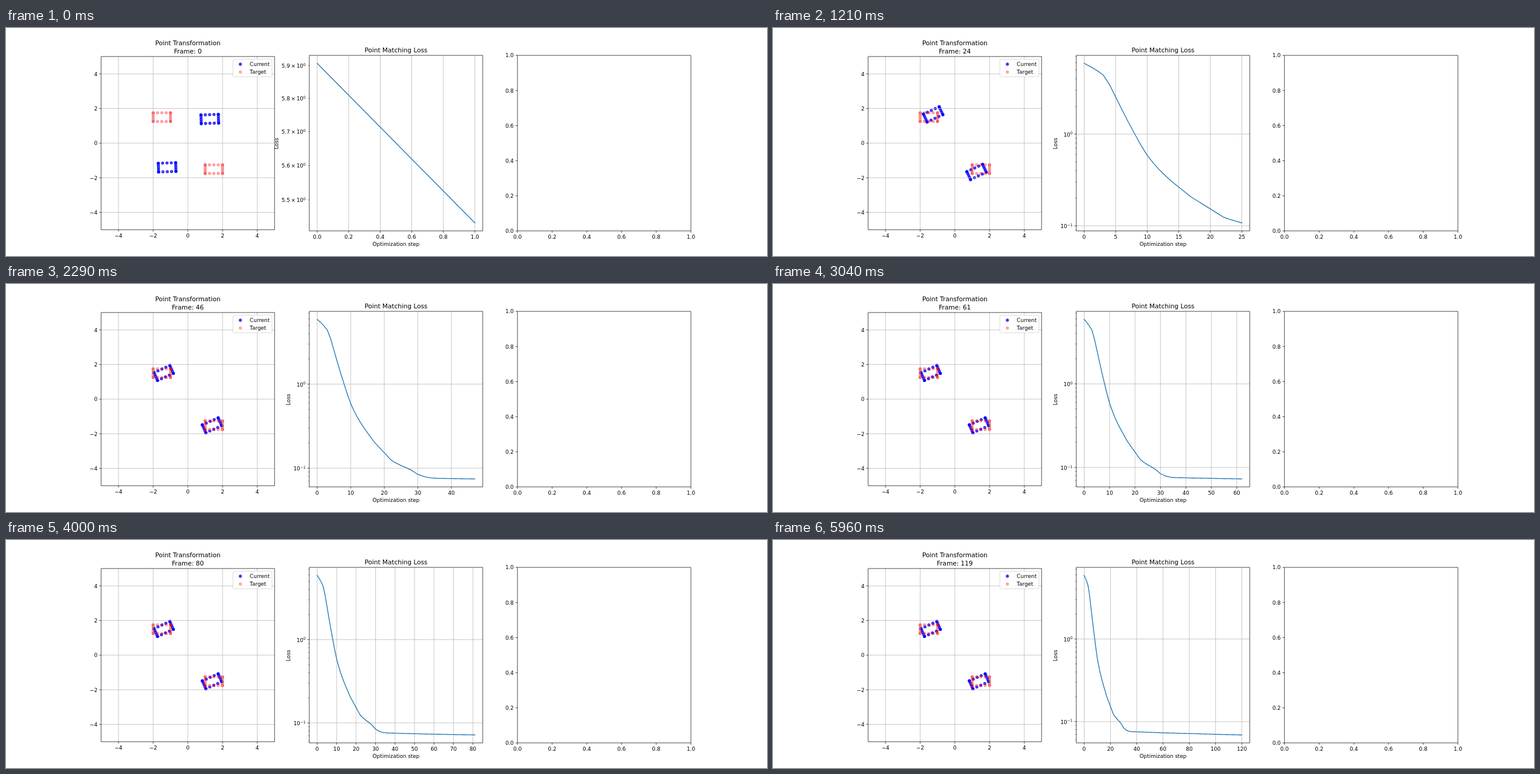
Animation, 1280 px wide and 384 px high, one loop 6000 ms. Source, as an HTML page with a canvas:

```html
<!DOCTYPE html>
<html>
<head>
<meta charset="utf-8">
<style>
  html, body { margin: 0; width: 100%; height: 100%; overflow: hidden; background: #fff; }
  canvas { display: block; width: 1280px; height: 384px; }
</style>
</head>
<body>
<canvas id="stage"></canvas>
<script>
const PT = 64 / 72;                       // pixels per typographic point
const FONT = 10 * PT, TITLE = 12 * PT;
const SIZE = 291.76, TOP = 46.08, BOTTOM = 341.76;
const points = { x: 160, y: 48.04, w: SIZE, h: SIZE };
const loss = { x: 510.12, y: TOP, w: SIZE, h: BOTTOM - TOP };
const empty = { x: 860.24, y: TOP, w: SIZE, h: BOTTOM - TOP };

// [step, loss]; interpolated in log space
const LOSS = [[0, 5.907], [1, 5.434], [2, 4.95], [3, 4.42], [4, 3.48], [5, 2.53], [6, 1.84],
  [7, 1.35], [8, 1.01], [9, .757], [10, .585], [11, .48], [12, .402], [13, .345], [14, .3],
  [15, .264], [17, .205], [20, .153], [22, .1253], [23, .118], [25, .1075], [27, .0995],
  [28, .095], [29, .0895], [30, .0843], [32, .079], [34, .0765], [36, .0757], [47, .0745],
  [62, .073], [81, .0717], [101, .0701], [120, .069]].map(([s, v]) => [s, Math.log10(v)]);

// [frame, polar angle, radius, tilt] of one rectangle; the other mirrors it
const POSE = [[0, 48.6, 1.86, 2], [2, 55, 1.89, 5], [4, 71, 1.95, 10], [9, 105, 2.05, 20],
  [14, 118, 2.08, 24], [19, 123.5, 2.08, 25], [24, 127, 2.08, 25], [29, 131, 2.065, 24.5],
  [33, 132.7, 2.055, 24]];

const canvas = document.getElementById("stage"), ctx = canvas.getContext("2d");
const ratio = window.devicePixelRatio || 1;
canvas.width = 1280 * ratio;
canvas.height = 384 * ratio;
ctx.scale(ratio, ratio);

function sample(keys, at, column = 1) {
  const i = keys.findIndex(k => k[0] >= at);
  if (i < 0) return keys[keys.length - 1][column];
  if (i === 0) return keys[0][column];
  const a = keys[i - 1], b = keys[i];
  return a[column] + (b[column] - a[column]) * (at - a[0]) / (b[0] - a[0]);
}

function line(x1, y1, x2, y2, color = "#000", width = .8 * PT) {
  ctx.strokeStyle = color;
  ctx.lineWidth = width;
  ctx.beginPath();
  ctx.moveTo(x1, y1);
  ctx.lineTo(x2, y2);
  ctx.stroke();
}

function setFont(size) {
  ctx.font = `${size}px "DejaVu Sans", sans-serif`;
}

function text(str, x, y, align = "center", size = FONT) {
  setFont(size);
  ctx.fillStyle = "#000";
  ctx.textAlign = align;
  ctx.fillText(str, x, y);
}

function width(str, size = FONT) {
  setFont(size);
  return ctx.measureText(str).width;
}

const signed = str => String(str).replace("-", "\u2212");

function ticks(lo, hi) {
  const raw = (hi - lo) / 9, scale = 10 ** Math.floor(Math.log10(raw));
  const step = scale * [1, 2, 2.5, 5, 10].find(s => s * scale >= raw - 1e-9);
  let digits = 0;
  while (Math.abs(step * 10 ** digits - Math.round(step * 10 ** digits)) > 1e-6) digits++;
  const out = [];
  for (let i = Math.ceil(lo / step - 1e-9); i * step <= hi + 1e-9; i++)
    out.push({ value: i * step, label: signed((i * step).toFixed(digits)) });
  return out;
}

function xTick(ax, x, label) {
  const y = ax.y + ax.h;
  line(x, y, x, y + 3.5 * PT);
  text(label, x, y + 13.5);
}

function yTick(ax, y, label) {
  line(ax.x, y, ax.x - 3.5 * PT, y);
  if (label) text(label, ax.x - 7 * PT, y + 3.3, "right");
}

function frameBox(ax) {
  ctx.strokeStyle = "#000";
  ctx.lineWidth = .8 * PT;
  ctx.strokeRect(ax.x, ax.y, ax.w, ax.h);
}

function dot(x, y, color) {
  ctx.fillStyle = ctx.strokeStyle = color;
  ctx.lineWidth = 1.5 * PT;
  ctx.beginPath();
  ctx.arc(x, y, Math.sqrt(20) / 2 * PT, 0, 2 * Math.PI);
  ctx.fill();
  ctx.stroke();
}

const BLUE = "rgba(0,0,255,.7)", RED = "rgba(255,0,0,.3)";
const px = v => points.x + (v + 5) * SIZE / 10;
const py = v => points.y + (5 - v) * SIZE / 10;

// Five dots per side, so corners are drawn twice
function rectangle(cx, cy, tilt, color) {
  const c = Math.cos(tilt), s = Math.sin(tilt);
  const place = (u, v) => dot(px(cx + u * c - v * s), py(cy + u * s + v * c), color);
  for (let i = -2; i <= 2; i++) {
    for (const side of [-1, 1]) {
      place(i / 4, side / 4);
      place(side / 2, i / 8);
    }
  }
}

function drawLegend() {
  const x = 381.7, y = 52.5;
  ctx.fillStyle = "rgba(255,255,255,.8)";
  ctx.strokeStyle = "rgba(204,204,204,.8)";
  ctx.lineWidth = PT;
  ctx.beginPath();
  ctx.roundRect(x, y, 65.6, 29.6, 1.8);
  ctx.fill();
  ctx.stroke();
  [["Current", BLUE], ["Target", RED]].forEach(([name, color], i) => {
    dot(x + 12.5, y + 8.5 + 13.1 * i, color);
    text(name, x + 28.4, y + 11.2 + 13.1 * i, "left");
  });
}

function drawPoints(frame) {
  const [angle, radius, tilt] = [1, 2, 3].map(c => sample(POSE, frame, c));
  const rad = Math.PI / 180, drift = .035 * Math.max(0, 1 - frame / 12);
  const x = radius * Math.cos(angle * rad), y = radius * Math.sin(angle * rad);
  rectangle(x + drift, y, tilt * rad, BLUE);
  rectangle(-x + drift, -y, tilt * rad, BLUE);
  rectangle(-1.5, 1.5, 0, RED);
  rectangle(1.5, -1.5, 0, RED);
  for (let v = -4; v <= 4; v += 2) {
    line(px(v), points.y, px(v), points.y + SIZE, "#b0b0b0");
    line(points.x, py(v), points.x + SIZE, py(v), "#b0b0b0");
  }
  for (let v = -4; v <= 4; v += 2) {
    xTick(points, px(v), signed(v));
    yTick(points, py(v), signed(v));
  }
  frameBox(points);
  drawLegend();
  text("Point Transformation", 305.88, 29.3, "center", TITLE);
  text("Frame: " + frame, 305.88, 42.7, "center", TITLE);
}

// Right-aligned power label; returns its left edge
function powerLabel(factor, exponent, y) {
  const base = y + 3.9, small = FONT * .7, gap = 1.75;
  let x = loss.x - 7 * PT;
  const put = (str, dy = 0, size = FONT) => {
    text(str, x, base + dy, "right", size);
    x -= width(str, size);
  };
  put(signed(exponent), -3.4, small);
  put("10");
  if (factor) {
    x -= gap;
    put("\u00d7");
    x -= gap;
    put(factor);
  }
  return x;
}

function logTicks(lo, hi) {
  const out = [], decades = hi - lo;
  const labelled = decades > 1 ? [] : decades > .4 ? [2, 3, 4, 6] : [2, 3, 4, 5, 6, 7, 8, 9];
  for (let e = Math.floor(lo); e <= hi; e++) {
    for (let m = 1; m <= 9; m++) {
      const at = e + Math.log10(m);
      if (at < lo || at > hi) continue;
      out.push({ at, e, major: m === 1, shown: m === 1 || labelled.includes(m), factor: m > 1 ? String(m) : "" });
    }
  }
  if (out.length > 1) return out;
  return ticks(10 ** lo, 10 ** hi).map(t => ({
    at: Math.log10(t.value), e: 0, major: false, shown: true, factor: t.label
  }));
}

function drawLoss(frame) {
  const last = frame + 1, high = LOSS[0][1], low = sample(LOSS, last);
  const margin = (high - low) * .05;
  const x = s => loss.x + loss.w * (s / last + .05) / 1.1;
  const y = v => loss.y + loss.h * (high + margin - v) / (high - low + 2 * margin);
  const xs = ticks(-.05 * last, 1.05 * last), ys = logTicks(low - margin, high + margin);

  for (const t of xs) line(x(t.value), loss.y, x(t.value), BOTTOM, "#b0b0b0");
  for (const t of ys) if (t.major) line(loss.x, y(t.at), loss.x + loss.w, y(t.at), "#b0b0b0");

  ctx.strokeStyle = "#1f77b4";
  ctx.lineWidth = 1.5 * PT;
  ctx.lineJoin = "round";
  ctx.lineCap = "square";
  ctx.beginPath();
  for (let s = 0; s <= last; s++) ctx.lineTo(x(s), y(sample(LOSS, s)));
  ctx.stroke();
  ctx.lineCap = "butt";

  for (const t of xs) xTick(loss, x(t.value), t.label);
  let left = loss.x;
  for (const t of ys) {
    if (t.major) yTick(loss, y(t.at));
    else line(loss.x, y(t.at), loss.x - 2 * PT, y(t.at), "#000", .6 * PT);
    if (t.shown) left = Math.min(left, powerLabel(t.factor, t.e, y(t.at)));
  }
  frameBox(loss);
  const middle = loss.x + loss.w / 2;
  text("Point Matching Loss", middle, 40.75, "center", TITLE);
  text("Optimization step", middle, 367.4);
  ctx.save();
  ctx.translate(left - 5.6, (TOP + BOTTOM) / 2 + .6);
  ctx.rotate(-Math.PI / 2);
  text("Loss", 0, 0);
  ctx.restore();
}

function drawEmpty() {
  for (let i = 0; i <= 5; i++) {
    const label = (i / 5).toFixed(1);
    xTick(empty, empty.x + empty.w * i / 5, label);
    yTick(empty, BOTTOM - empty.h * i / 5, label);
  }
  frameBox(empty);
}

// 20 steps per second shown on a 24 Hz clock
function draw(now) {
  const clock = Math.min(143, Math.floor((now % 6000 + 5) * .024));
  const frame = Math.ceil(clock * 5 / 6 - .5 - 1e-6);
  ctx.fillStyle = "#fff";
  ctx.fillRect(0, 0, 1280, 384);
  drawPoints(frame);
  drawLoss(frame);
  drawEmpty();
}

const start = performance.now();
function loop() {
  draw(performance.now() - start);
  requestAnimationFrame(loop);
}
loop();
</script>
</body>
</html>
```
